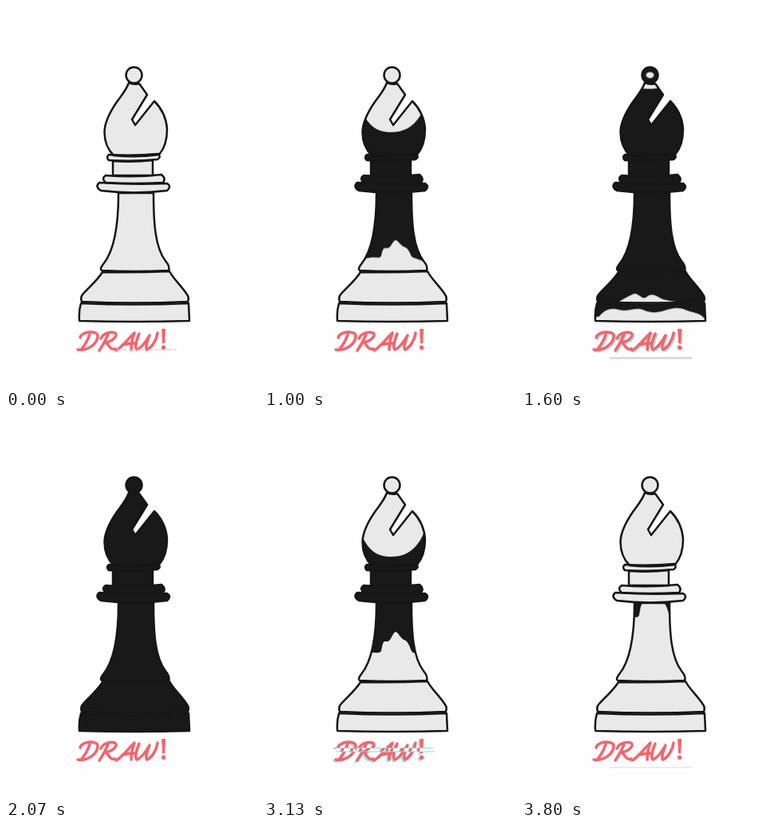
Animation, 316 px wide and 478 px high, one loop 3870 ms. Source, as an HTML page without scripts:

```html
<!DOCTYPE html>
<html lang="en">
<head>
<meta charset="utf-8">
<title>Draw!</title>
<style>
html, body { margin: 0; width: 100%; height: 100%; overflow: hidden; background: #fefefe; }
svg { display: block; width: 100%; height: 100%; }

.paper { fill: #e9e9e9; }
.lines { fill: none; stroke: #161616; stroke-width: 2.5; stroke-linejoin: round; stroke-linecap: round; }
.ink { fill: #191919; }
.ink, .hole, .glitch { animation: 3870ms linear infinite; }
.glitch { animation-timing-function: step-end; }

.bulb-ink { animation-name: bulb; }
.band-ink { animation-name: band; fill-rule: evenodd; }
.rim-ink { animation-name: rim; }
.stem-ink { animation-name: stem; }
.skirt-ink { animation-name: skirt; }
.foot-ink { animation-name: foot; }
.hole { animation-name: hole; fill: #e9e9e9; transform-box: fill-box; transform-origin: center; }

/* Ink climbs through the head */
@keyframes bulb {
  0%, 4% { transform: translateY(197px) scaleY(.1); }
  13.7% { transform: translateY(184px) scaleY(.5); }
  25.8% { transform: translateY(158px) scaleY(.8); }
  41.3% { transform: translateY(104px) scaleY(.6); }
  44%, 57% { transform: translateY(88px) scaleY(.6); }
  65.4% { transform: translateY(121px) scaleY(.8); }
  80.9% { transform: translateY(176px) scaleY(.8); }
  91%, 100% { transform: translateY(197px) scaleY(.1); }
}
@keyframes hole {
  0%, 37% { transform: scale(1); }
  41.3% { transform: scale(.5, .4); }
  44%, 57% { transform: scale(0); }
  62%, 100% { transform: scale(1); }
}
/* Ink runs down through the rest */
@keyframes band {
  0%, 2% { transform: translateY(174px); }
  13.7% { transform: translateY(203px); }
  19%, 84% { transform: translateY(226px); }
  96%, 100% { transform: translateY(174px); }
}
@keyframes rim {
  0%, 12% { transform: translateY(215px); }
  13.7% { transform: translateY(222px); }
  19%, 84% { transform: translateY(236px); }
  93%, 100% { transform: translateY(215px); }
}
@keyframes stem {
  0% { transform: translateY(198px) scaleY(1); }
  1.8% { transform: translateY(214px) scaleY(1); }
  13.7% { transform: translateY(250px) scaleY(1.3); }
  25.8% { transform: translateY(296px) scaleY(.75); }
  35%, 62% { transform: translateY(340px) scaleY(.75); }
  65.4% { transform: translateY(332px) scaleY(.75); }
  80.9% { transform: translateY(274px) scaleY(.9); }
  98.2% { transform: translateY(225px) scaleY(1.1); }
  100% { transform: translateY(202px) scaleY(1.1); }
}
@keyframes skirt {
  0%, 26% { transform: translateY(298px); }
  41.3% { transform: translateY(360px); }
  46%, 57% { transform: translateY(378px); }
  65.4% { transform: translateY(346px); }
  76%, 100% { transform: translateY(298px); }
}
@keyframes foot {
  0%, 34% { transform: translateY(355px); }
  41.3% { transform: translateY(379px); }
  48%, 54% { transform: translateY(398px); }
  63%, 100% { transform: translateY(355px); }
}

/* Lettering glitch */
.word { stroke-linecap: round; stroke-linejoin: round; stroke-width: 3.5; }
#word text { font: 600 37px "Open Sans", sans-serif; stroke: none; }
.red { stroke: #f5646c; fill: #f5646c; }
.cyan { stroke: #a0e2de; fill: #a0e2de; animation-name: ghost; }
.bar { fill: #dcdcdc; animation-name: bar; }
.slice { animation-name: slice; }
.stitch { stroke: #eeb4b7; stroke-dasharray: 13 3 6 2; animation-name: stitch; }
@keyframes ghost {
  0% { opacity: 0; transform: none; }
  22.4% { opacity: .55; transform: translate(1px, .5px); }
  29.3% { opacity: 0; }
  36.2% { opacity: 1; transform: translate(1.8px, 1.2px); }
  43% { opacity: .6; transform: translate(-1.5px, 1px); }
  50% { opacity: 0; }
  56.8% { opacity: .8; transform: translate(1.5px, 0); }
  63.7% { opacity: .7; transform: translate(-1.2px, .8px); }
  70.6% { opacity: 0; }
  77.5% { opacity: 1; transform: translate(-2px, 1.5px); }
  84.4%, 100% { opacity: 0; transform: none; }
}
@keyframes bar {
  0% { opacity: 0; }
  5.1% { opacity: 1; transform: translateY(435px); }
  8.6% { opacity: 0; }
  17.2% { opacity: 1; transform: translateY(444px) scaleY(3); }
  20.6% { opacity: 0; }
  39.6% { opacity: 1; transform: translateY(439px) scaleY(3); }
  43% { opacity: 1; transform: translateY(445px) scaleY(2); }
  46.5% { opacity: 0; }
  60.3% { opacity: 1; transform: translateY(436px); }
  63.7% { opacity: 0; }
  74.1% { opacity: 1; transform: translateY(445px) scaleY(2); }
  77.5% { opacity: 0; }
  91.3% { opacity: 1; transform: translateY(440px) scaleY(2); }
  94.8% { opacity: 0; }
  98.1%, 100% { opacity: 1; transform: translateY(439.5px); }
}
@keyframes stitch {
  0% { opacity: 1; transform: translateY(430px); }
  1.7% { opacity: 0; }
  12% { opacity: 1; transform: translateY(411px); }
  15.5%, 100% { opacity: 0; }
}
@keyframes slice {
  0% { opacity: 0; }
  31% { opacity: 1; }
  34.4% { opacity: 0; }
  51.7% { opacity: 1; }
  53.4% { opacity: 0; }
  79.2% { opacity: 1; }
  82.7%, 100% { opacity: 0; }
}
</style>
</head>
<body>
<svg viewBox="0 0 316 478">
  <defs>
    <circle id="ball" cx="160.5" cy="86.5" r="10"/>
    <path id="bulb" d="M154 96C151 105 146 110 139 120C130 133 123.5 146 123.5 158C123.5 170 128 180 135 187Q163 190 192 186C199 178 202 166 202 154C201 140 195 128 186 119L162 149L158 142L177 111L167 97Q160 99 154 96Z"/>
    <path id="collar" d="M129 186Q160 188 191 185Q195 189 190 192Q160 195 129 193Q125 189 129 186Z"/>
    <path id="band" d="M134 194Q160 196 184 193V212H134Z"/>
    <path id="ring" d="M125 212Q160 215 195 211Q201 216 197 221Q160 223 125 221Q119 216 125 212Z"/>
    <path id="rim" d="M117 221Q160 224 202 222Q208 226 202 231Q160 236 119 231Q111 226 117 221Z"/>
    <path id="stem" d="M141 234C141 270 136 306 122 323Q117 329 120 331Q160 333 204 331Q206 326 200 319C187 302 185 272 185 234Z"/>
    <path id="skirt" d="M121 333C114 344 104 352 96 361Q93 365 95 370Q160 373 228 370Q230 365 227 361C220 350 211 343 205 332Q160 334 121 333Z"/>
    <path id="foot" d="M94 372Q160 375 229 372L230 394Q160 396 92 394Q91 382 94 372Z"/>
    <g id="piece">
      <use href="#ball"/><use href="#bulb"/><use href="#collar"/><use href="#band"/><use href="#ring"/>
      <use href="#rim"/><use href="#stem"/><use href="#skirt"/><use href="#foot"/>
    </g>
    <clipPath id="in-bulb"><use href="#bulb"/></clipPath>
    <clipPath id="in-collar"><use href="#collar"/></clipPath>
    <clipPath id="in-band"><use href="#band"/><use href="#ring"/></clipPath>
    <clipPath id="in-rim"><use href="#rim"/></clipPath>
    <clipPath id="in-stem"><use href="#stem"/></clipPath>
    <clipPath id="in-skirt"><use href="#skirt"/></clipPath>
    <clipPath id="in-foot"><use href="#foot"/></clipPath>
    <clipPath id="strip"><path d="M80 415H220V420H80Z"/></clipPath>
    <path id="rim-edge" d="M105-40V2Q135-2 150 1T180 0T212 2V-40Z"/>

    <!-- Brush lettering -->
    <g id="word">
      <g fill="none">
        <path d="M93 415C94 407 115 405 115 413C115 422 103 432 90 430M105 411Q101 422 95 429"/>
        <path d="M128 411Q124 421 117 431M119 416C123 407 139 406 138 412C137 417 130 420 125 421C129 423 130 431 137 429"/>
        <path d="M138 431C146 427 154 415 161 409Q157 419 157 430M146 424Q154 422 162 422"/>
        <path d="M167 410C164 417 161 427 164 430C170 428 176 419 180 412C177 420 174 429 177 430C183 427 189 418 190 409"/>
      </g>
      <text x="192.5" y="430">!</text>
    </g>
  </defs>

  <use href="#piece" class="paper"/>

  <use href="#ball" class="ink"/>
  <circle class="hole" cx="160.5" cy="86.5" r="10"/>
  <g clip-path="url(#in-bulb)">
    <path class="ink bulb-ink" d="M115-60C127-6 143 0 160 0C180 0 198-14 206-60V900H115Z"/>
  </g>
  <g clip-path="url(#in-collar)">
    <g transform="translate(0 -36)"><use href="#rim-edge" class="ink rim-ink"/></g>
  </g>
  <g clip-path="url(#in-band)">
    <path class="ink band-ink" d="M110-60H210V16H110ZM144 6C146-2 152 1 157-2C163-4 166 2 172 4Q172 7 168 6Q156 4 144 6Z"/>
  </g>
  <g clip-path="url(#in-rim)">
    <use href="#rim-edge" class="ink rim-ink"/>
  </g>
  <g clip-path="url(#in-stem)">
    <path class="ink stem-ink" d="M105-200V34L125 27C139 21 144 28 147 22C149 10 150 8 153 9C159 10 160 0 164-4C168-6 170 4 176 7C182 9 183 20 186 24L215 38V-200Z"/>
  </g>
  <g clip-path="url(#in-skirt)">
    <path class="ink skirt-ink" d="M85-150V30L102 22C115 14 130 4 140 0C146-2 150 8 156 4C162-2 168 2 175 6C185 10 200 8 225 24L240 30V-150Z"/>
  </g>
  <g clip-path="url(#in-foot)">
    <path class="ink foot-ink" d="M85-60V12L97 9C104 0 112-2 122 1S143-3 152 1S168 5 178 2S196-3 205 1S222 4 228 11H240V-60Z"/>
  </g>

  <use href="#piece" class="lines"/>

  <g role="img" aria-label="DRAW!">
    <g class="word"><use href="#word" class="glitch cyan"/></g>
    <g class="word"><use href="#word" class="red"/></g>
    <g class="glitch slice">
      <path d="M84 415H216V420H84Z" fill="#fefefe"/>
      <g clip-path="url(#strip)">
        <g class="word"><use href="#word" class="red" x="-4"/></g>
      </g>
      <path d="M86 415.5H212M90 420H214" stroke="#8fdcd6" stroke-width="1.2"/>
    </g>
    <rect class="glitch bar" x="110" width="103" height="1"/>
    <path class="glitch stitch" d="M138 0H214"/>
  </g>
</svg>
</body>
</html>
```
